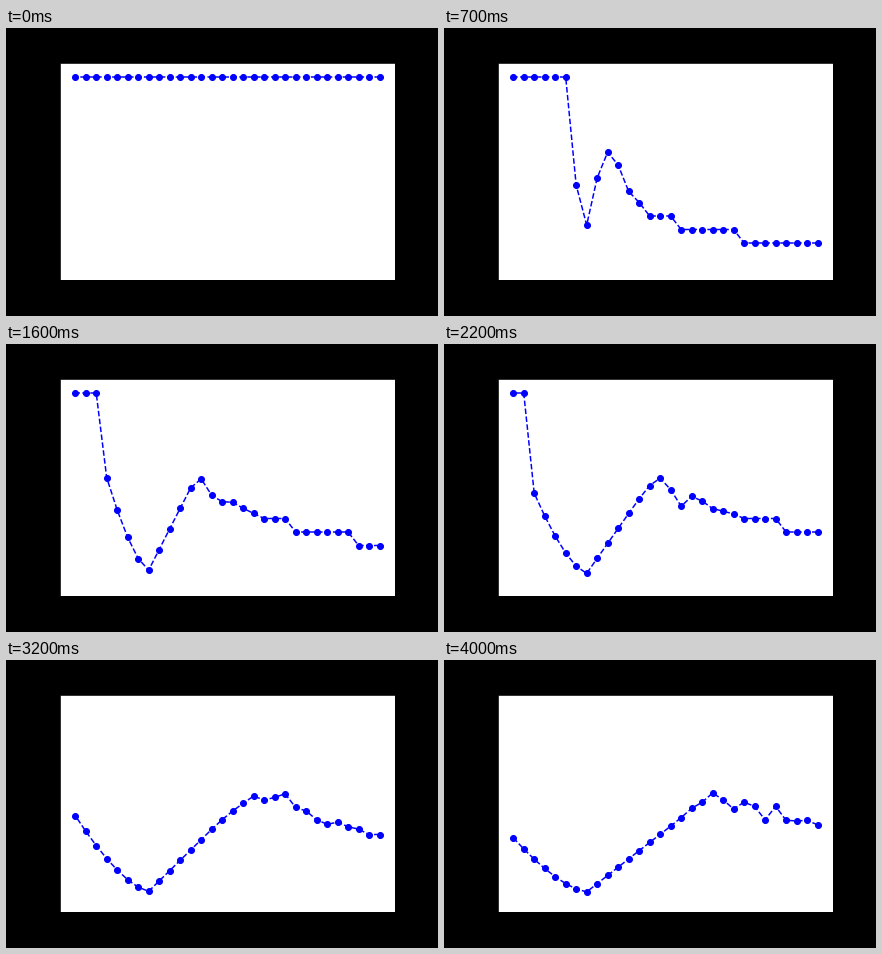
Recreate the animation shown at these times as a matplotlib script. Size 432 px wide and 288 px high, loop 4.1 s.

```python
import numpy as np
import matplotlib.pyplot as plt
from matplotlib.animation import FuncAnimation

STEPS = 41
N = 30
CAP = 193.0      # plateau where every point starts
DIP = 7          # index of the lowest point
UNIT = 13.5      # height of one stair in the tail
REACH = 0.255    # left points drop once their scaled distance is below this

index = np.arange(N)
distance = np.abs(index - DIP)
jitter = np.random.default_rng(4).normal(size=(STEPS, N))


def soft_min(a, b, sharp=10):
    return (a ** -sharp + b ** -sharp) ** (-1 / sharp)


def heights(t):
    """Valley around the dip that widens in proportion to t."""
    if t == 0:
        return np.full(N, CAP)
    u = distance / t
    floor = 9 + 1760 / t ** 2

    left = np.where(u > REACH, CAP, floor + 740 * u ** 1.5)

    # The right slope rises to a noisy peak, then falls off in stairs.
    fall = 54 * np.maximum(u, 1e-3) ** -0.63
    right = soft_min(floor + 330 * u, fall)
    right *= 1 + 0.08 * jitter[t] * np.exp(-((u - 0.4) / 0.12) ** 2)
    stairs = UNIT * np.maximum(np.round(fall / UNIT), 1)
    right = np.where(u > 0.65, stairs, right)

    return np.minimum(np.where(index <= DIP, left, right), CAP)


fig = plt.figure(figsize=(6, 4), dpi=72, facecolor="black")
ax = fig.add_axes([0.125, 0.125, 0.775, 0.755], facecolor="white")
ax.set_xticks([])
ax.set_yticks([])
margin = 0.05 * (N - 1)
ax.set_xlim(-margin, N - 1 + margin)
ax.set_ylim(-10, 207.44)
# Drawn from right to left, so the dashes start at the right end.
line, = ax.plot(index[::-1], heights(0)[::-1], "o--", color="blue",
                lw=1.5, ms=6)


def update(t):
    line.set_ydata(heights(t)[::-1])
    return line,


anim = FuncAnimation(fig, update, frames=STEPS, interval=100, repeat=True,
                     repeat_delay=0, blit=False)
plt.show()
```
